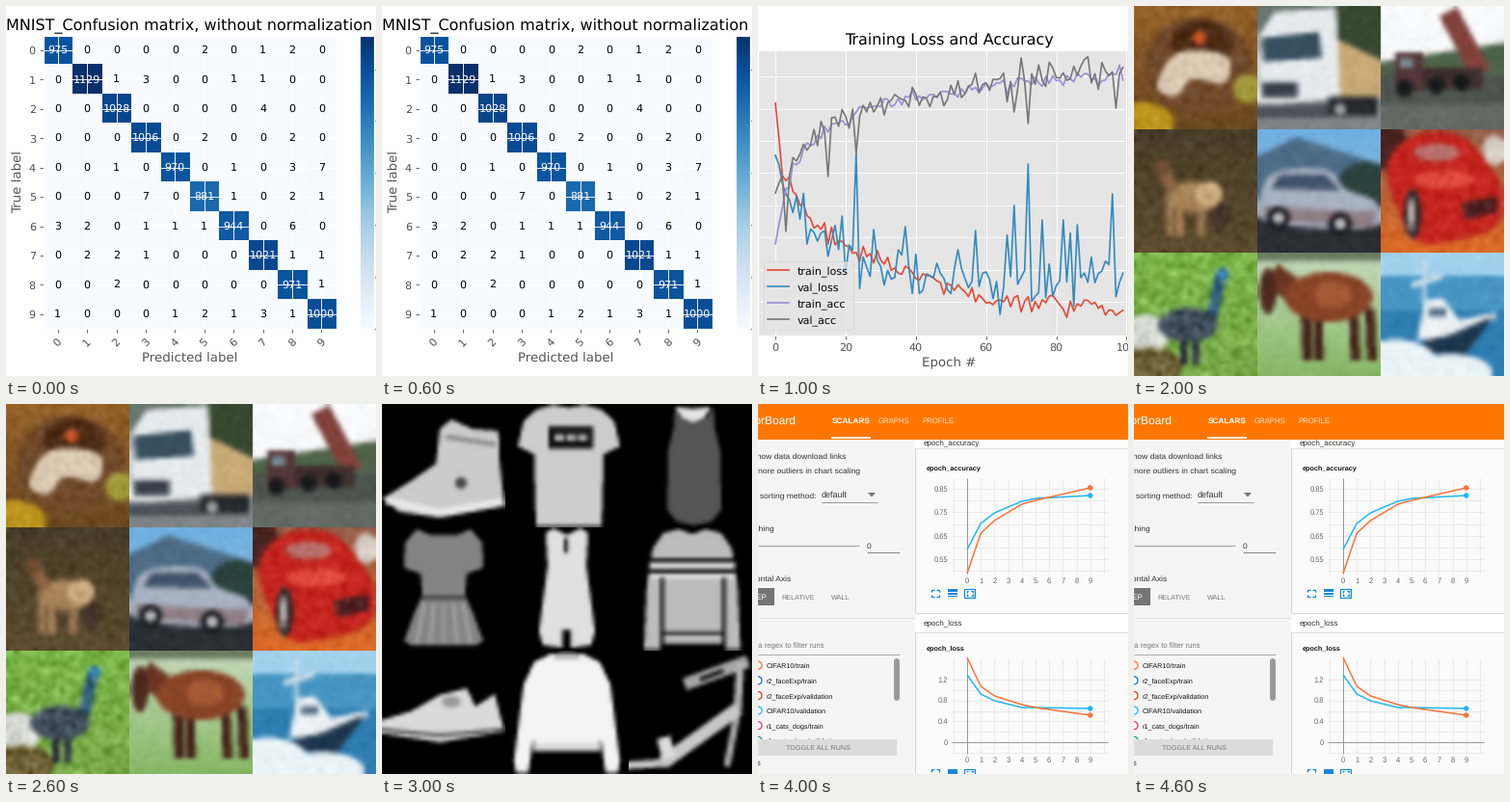
These frames come from a looping animation (384x384 px, 5000 ms). A matplotlib script:

```python
import numpy as np
import matplotlib.pyplot as plt
from matplotlib.animation import FuncAnimation
from matplotlib.colors import to_rgb
from matplotlib.patches import Circle, Rectangle
from matplotlib.path import Path

SIZE, DPI, CELL = 384, 80, 128
PT = 72 / DPI  # points per pixel

plt.style.use("ggplot")
plt.rcParams["text.hinting"] = "none"
fig = plt.figure(figsize=(SIZE / DPI, SIZE / DPI), dpi=DPI, facecolor="white")


def add_axes(x0, y0, x1, y1):
    return fig.add_axes([x0 / SIZE, 1 - y1 / SIZE, (x1 - x0) / SIZE, (y1 - y0) / SIZE])


def canvas():
    ax = add_axes(0, 0, SIZE, SIZE)
    ax.set(xlim=(0, SIZE), ylim=(SIZE, 0))
    ax.axis("off")
    return ax


# ---------- confusion matrix ----------
def confusion_scene():
    cm = np.diag([975, 1129, 1028, 1006, 970, 881, 944, 1021, 971, 1000])
    errors = {
        0: {5: 2, 7: 1, 8: 2}, 1: {2: 1, 3: 3, 6: 1, 7: 1}, 2: {7: 4},
        3: {5: 2, 8: 2}, 4: {2: 1, 6: 1, 8: 3, 9: 7},
        5: {3: 7, 6: 1, 8: 2, 9: 1}, 6: {0: 3, 1: 2, 3: 1, 4: 1, 5: 1, 8: 6},
        7: {1: 2, 2: 2, 3: 1, 8: 1, 9: 1}, 8: {2: 2, 9: 1},
        9: {0: 1, 4: 1, 5: 2, 6: 1, 7: 3, 8: 1},
    }
    for row, cols in errors.items():
        for col, count in cols.items():
            cm[row, col] = count
    ax = add_axes(38.6, 30.8, 342.6, 335)
    im = ax.imshow(cm, cmap="Blues", interpolation="nearest", aspect="auto")
    ax.set_title("MNIST_Confusion matrix, without normalization")
    ax.set(xlabel="Predicted label", ylabel="True label",
           xticks=range(10), yticks=range(10))
    ax.tick_params(axis="x", labelrotation=45)
    for (row, col), count in np.ndenumerate(cm):
        ax.text(col, row, str(count), ha="center", va="center",
                color="white" if count > cm.max() / 2 else "black")
    cax = add_axes(367, 30.8, 382.4, 335)
    cax.grid(False)
    fig.colorbar(im, cax=cax)
    return [ax, cax]


# ---------- training curves, heights in stage pixels ----------
def training_scene():
    rng = np.random.default_rng(4)
    epochs = np.arange(100)

    def curve(trend, noise, spikes=None):
        """Noise around a trend through key points, with single-epoch spikes."""
        y = np.interp(epochs, list(trend), list(trend.values()))
        y += rng.normal(0, 1, 100) * noise * np.minimum(1, epochs / 4)
        for epoch, height in (spikes or {}).items():
            y[epoch] = height
        return y

    acc = {0: 247, 2: 206, 5: 172, 9: 148, 15: 124, 26: 106, 40: 94, 60: 82, 99: 70}
    series = {
        "train_loss": curve({0: 101, 2: 172, 8: 213, 20: 252, 40: 279, 60: 304, 99: 316}, 5),
        "val_loss": curve({0: 155, 4: 195, 10: 230, 30: 268, 50: 285, 75: 290, 99: 278}, 17,
                          {23: 153, 28: 232, 52: 253, 57: 233, 68: 207, 72: 164, 76: 222,
                           82: 222, 86: 227, 96: 195}),
        "train_acc": curve(acc, 4),
        "val_acc": curve({**acc, 0: 194, 2: 178, 5: 160}, 8,
                         {3: 234, 15: 177, 23: 153, 68: 110, 72: 122, 97: 106}),
    }
    ax = add_axes(0, 46.1, 396.8, 341.8)
    for name, y in series.items():
        ax.plot(y, label=name)
    ax.set(xlim=(-4.95, 103.95), ylim=(341.8, 46.1), xlabel="Epoch #",
           xticks=range(0, 101, 20), yticks=73.3 + 33.4 * np.arange(8))
    ax.set_title("Training Loss and Accuracy")
    ax.legend(loc="lower left", labelspacing=0.55)
    return [ax]


# ---------- shapes: a colour and an outline in tile pixels ----------
def poly(color, *xy):
    return color, np.reshape(xy, (-1, 2))


def bar(color, x0, y0, x1, y1):
    return poly(color, x0, y0, x1, y0, x1, y1, x0, y1)


def oval(color, x, y, rx, ry=None):
    a = np.linspace(0, 2 * np.pi, 24)
    return color, np.column_stack([x + rx * np.cos(a), y + (ry or rx) * np.sin(a)])


def limb(color, width, x0, y0, x1, y1):
    a, b = np.array([x0, y0]), np.array([x1, y1])
    side = np.array([y0 - y1, x1 - x0]) * width / 2 / np.hypot(x1 - x0, y1 - y0)
    return color, np.array([a + side, b + side, b - side, a - side])


def blob(color, *xy):
    """Closed Catmull-Rom curve through key points."""
    b = np.reshape(xy, (-1, 1, 2)).astype(float)
    a, c, d = (np.roll(b, k, axis=0) for k in (1, -1, -2))
    t = np.linspace(0, 1, 6, endpoint=False)[:, None]
    curve = b + t / 2 * (c - a + t * (2 * a - 5 * b + 4 * c - d + t * (3 * (b - c) + d - a)))
    return color, curve.reshape(-1, 2)


def mirror(color, center, *half):
    """Symmetric outline; half lists distances from the centre line and heights."""
    right = np.reshape(half, (-1, 2))
    left = right[::-1] * [-1, 1]
    return color, np.vstack([right, left]) + [center, 0]


def tile(ax, index, n, top, bottom, *shapes, grain=0.0):
    """Rasterise shapes on an n x n grid and enlarge it smoothly."""
    c = (np.arange(4 * n) + 0.5) * CELL / (4 * n)
    gx, gy = np.meshgrid(c, c)
    points = np.column_stack([gx.ravel(), gy.ravel()])
    mix = (gy / CELL)[..., None]
    img = np.array(to_rgb(top)) * (1 - mix) + np.array(to_rgb(bottom)) * mix
    for color, outline in shapes:
        img[Path(outline).contains_points(points).reshape(gx.shape)] = to_rgb(color)
    img = img.reshape(n, 4, n, 4, 3).mean(axis=(1, 3))
    img += np.random.default_rng(index).normal(0, grain, (n, n, 1))
    x, y = index % 3 * CELL, index // 3 * CELL
    ax.imshow((img.clip(0, 1) * 255).astype(np.uint8), aspect="auto",
              interpolation="bicubic", extent=(x, x + CELL, y + CELL, y))


def photo_scene():
    ax = canvas()

    def photo(index, top, bottom, *shapes, grain=0.015):
        tile(ax, index, 32, top, bottom, *shapes, grain=grain)

    photo(0, "#96622a", "#6d4a24",
          oval("#70492a", 66, 62, 56, 50), oval("#4d2c16", 70, 40, 32, 26),
          blob("#dccab4", 40, 52, 68, 46, 98, 54, 94, 80, 60, 76, 44, 94, 24, 84),
          oval("#cf5a2c", 68, 33, 7),
          oval("#bd951f", 6, 120, 36, 20), oval("#a29a3a", 118, 86, 15, 15), grain=0.03)
    photo(1, "#66756c", "#80868a",
          bar("#3a4a32", 80, 0, 128, 60),
          poly("#c9ab78", 82, 34, 128, 56, 128, 94, 82, 94),
          poly("#e6ebee", 2, 30, 18, 6, 82, 2, 86, 96, 0, 104),
          poly("#38505f", 5, 33, 64, 27, 67, 54, 6, 58),
          bar("#39424c", 5, 79, 42, 95), bar("#4d545b", 0, 102, 74, 116),
          bar("#25282c", 74, 94, 124, 114), oval("#9a9da0", 86, 107, 6))
    photo(2, "#fbfcfd", "#f2f5f6",
          poly("#50644a", 0, 58, 128, 38, 128, 80, 0, 80),
          bar("#4f5651", 0, 72, 128, 102), bar("#646b66", 0, 102, 128, 128),
          limb("#81423c", 21, 70, 6, 104, 70),
          bar("#40302f", 40, 64, 106, 86), bar("#56383a", 15, 48, 44, 88),
          bar("#7b9195", 20, 54, 34, 64),
          *[oval("#17191b", x, 88 - 0.1 * x, 9) for x in (25, 58, 84)])
    legs = [limb("#a27f58", 9, x, 76, x, 111) for x in (38, 48, 70)]
    photo(3, "#483d29", "#5d4c2e",
          oval("#463528", 88, 90, 11, 17), *legs,
          oval("#a88359", 62, 70, 29, 16), oval("#cbab80", 78, 67, 14, 13),
          limb("#8a6240", 13, 42, 64, 30, 44), oval("#6e4d31", 28, 40, 8, 10), grain=0.03)
    wheels = [oval(color, x, y, r) for x, y in ((22, 92), (86, 98))
              for color, r in (("#17191d", 12), ("#bcbcc0", 6))]
    photo(4, "#6fb0e2", "#8fb4cc",
          poly("#4d6d87", 0, 28, 40, 8, 128, 36, 128, 80, 0, 80),
          oval("#2b423d", 112, 56, 28, 22), bar("#2b3036", 0, 74, 128, 128),
          blob("#a9b2c2", 4, 66, 20, 44, 72, 42, 92, 62, 124, 76, 118, 102, 10, 96),
          poly("#8f7f84", 6, 80, 124, 86, 120, 102, 8, 94),
          poly("#41546a", 14, 62, 24, 47, 70, 47, 86, 63), *wheels)
    photo(5, "#93604c", "#dd6a24",
          oval("#4a2420", 8, 18, 20, 26), oval("#d8cfc6", 118, 22, 12, 16),
          blob("#c4261f", 6, 44, 34, 6, 82, 6, 110, 34, 126, 62, 122, 98, 84, 114, 36, 114),
          oval("#b8706c", 58, 24, 24, 9), oval("#df4a3c", 66, 52, 32, 9),
          poly("#4e2024", 84, 76, 121, 69, 121, 86, 88, 94),
          oval("#2d272b", 33, 88, 9, 26), oval("#b3aaa8", 32, 88, 4, 18), grain=0.03)
    photo(6, "#79b548", "#7aa848",
          oval("#d8dcd4", 12, 84, 26, 20), oval("#6f6238", 16, 118, 34, 20),
          *[limb("#2d3640", 8, x, 84, x, 116) for x in (52, 64)],
          limb("#35607f", 12, 80, 70, 90, 24), oval("#2f78a8", 92, 22, 7, 6),
          oval("#424e5b", 56, 75, 31, 18), grain=0.07)
    front, back = (50, 62), (100, 117)
    photo(7, "#c9dbc0", "#86b763",
          bar("#6e7f61", 0, 0, 128, 9),
          *[limb("#45231a", 10, x, 58, x + 2, 112) for x in front + back],
          limb("#6b3623", 26, 14, 22, 44, 44), oval("#4e2a1e", 11, 40, 9, 24),
          oval("#8a4529", 74, 46, 46, 26), oval("#a55a35", 78, 44, 20, 14))
    photo(8, "#a5d3ee", "#8cc4e4",
          bar("#4796c4", 0, 24, 128, 60), bar("#2f7eb2", 0, 60, 128, 128),
          limb("#c5d9e4", 4, 45, 6, 45, 52), limb("#d4e4ec", 6, 32, 34, 64, 24),
          poly("#edf2f5", 38, 90, 46, 50, 64, 47, 82, 70, 120, 62, 118, 70, 72, 92),
          bar("#46617b", 50, 58, 68, 66),
          poly("#20384f", 42, 92, 70, 86, 117, 66, 88, 106, 50, 104),
          oval("#eaf4f9", 16, 114, 42, 24), oval("#eaf4f9", 72, 124, 44, 19))
    return [ax]


def clothes_scene():
    ax = canvas()

    def item(index, *shapes):
        tile(ax, index, 40, "black", "black", *shapes)

    black, dark = "#000000", "#141414"
    item(0,
         poly("#cbcbcb", 60, 26, 72, 16, 94, 26, 121, 28, 122, 60, 127, 106, 60, 118,
              18, 112, 1, 98, 30, 80, 56, 62),
         limb("#8f8f8f", 5, 66, 34, 118, 42), limb("#e9e9e9", 8, 4, 100, 60, 113),
         limb("#e9e9e9", 8, 60, 113, 126, 101), oval("#4a4a4a", 82, 82, 6))
    item(1,
         mirror("#cdcdcd", 66, 0, 4, 16, 1, 34, 6, 47, 18, 53, 44, 36, 52, 34, 126),
         bar(dark, 45, 23, 91, 46),
         *[bar("#a8a8a8", x, 31, x + 10, 38) for x in (51, 63, 75)])
    item(2,
         mirror("#565656", 68, 0, 18, 14, 14, 20, 2, 21, 24, 27, 48, 28, 110, 18, 122, 0, 126),
         mirror("#e6e6e6", 67, 0, 19, 12, 14, 18, 3, 0, 5))
    item(3,
         mirror("#848484", 64, 0, 8, 14, 8, 28, 2, 40, 16, 41, 42, 24, 48, 22, 70, 30, 88,
                41, 118, 34, 122),
         bar("#4c4c4c", 41, 70, 87, 75),
         *[limb("#a2a2a2", 4, 64 + d, 78, 64 + 1.4 * d, 121) for d in range(-20, 21, 10)])
    item(4,
         mirror("#e0e0e0", 64, 0, 8, 14, 1, 22, 6, 20, 40, 24, 70, 29, 108, 25, 122, 5, 125),
         bar(dark, 61, 11, 65, 26), bar(black, 59, 106, 68, 128))
    item(5,
         mirror("#bcbcbc", 66, 0, 7, 14, 2, 30, 6, 41, 22, 47, 60, 50, 126),
         *[bar(color, 22, y, 110, y + 5)
           for y, color in ((32, dark), (37, "#f0f0f0"), (43, dark), (48, "#e5e5e5"))],
         *[bar(dark, x - 2, 52, x + 2, 128) for x in (35, 99)],
         bar("#333333", 37, 108, 97, 112), bar(black, 34, 121, 100, 128))
    item(6,
         poly("#dadada", 0, 72, 30, 63, 60, 46, 88, 39, 97, 58, 117, 45, 127, 84,
              60, 95, 0, 86),
         limb("#5c5c5c", 4, 0, 82, 60, 88), limb("#5c5c5c", 4, 60, 88, 126, 82),
         oval("#9c9c9c", 72, 53, 10, 6))
    item(7,
         mirror("#f4f4f4", 64, 0, 6, 16, 3, 34, 12, 45, 35, 55, 114, 53, 126, 40, 126,
                35, 90, 34, 104),
         oval("#bdbdbd", 64, 6, 15, 4), bar("#d0d0d0", 31, 97, 97, 101))
    item(8,
         limb("#a5a5a5", 13, 58, 35, 124, 11), limb(black, 4, 74, 30, 98, 21),
         limb("#b5b5b5", 8, 116, 12, 113, 62), limb("#a9a9a9", 7, 114, 58, 102, 120),
         limb("#c8c8c8", 8, 0, 119, 44, 116), limb("#c8c8c8", 14, 36, 116, 114, 60),
         limb("#dcdcdc", 14, 36, 90, 42, 112))
    return [ax]


# ---------- dashboard ----------
def dashboard_scene():
    ax = canvas()
    orange, cyan, icon = "#ff7034", "#1fb6f2", "#1687d9"

    def rect(x0, y0, x1, y1, color):
        ax.add_patch(Rectangle((x0, y0), x1 - x0, y1 - y0, color=color, lw=0, zorder=3))

    def line(x, y, color, px=1.0):
        ax.plot(x, y, color=color, lw=px * PT, zorder=3, solid_capstyle="butt")

    def dot(x, y, r, **style):
        ax.add_patch(Circle((x, y), r, zorder=3, **style))

    def text(x, y, s, px=8.5, color="#333333", ha="left", weight="normal"):
        ax.text(x, y + 0.35 * px, s, fontsize=px * PT, color=color, ha=ha,
                va="baseline", weight=weight, family="Liberation Sans")

    def corners(x, y, w, h, arm):
        for sx in (-1, 1):
            for sy in (-1, 1):
                cx, cy = x + sx * w, y + sy * h
                line([cx - sx * arm, cx, cx], [cy, cy, cy - sy * arm], icon, 1.3)

    def chart(title, top, labels, step, first, axis_y, curves):
        bottom = top + 99
        text(175, top - 11, title, 7.3, "#111111", weight="bold")
        for x in 217 + 14.2 * np.arange(-1, 11):
            line([x, x], [top, bottom], "#e6e6e6", 0.8)
        for y in first + step / 2 * np.arange(8):
            line([201, 363], [y, y], "#e6e6e6", 0.8)
        line([217, 217], [top, bottom], "#9a9a9a")
        if axis_y:
            line([201, 363], [axis_y, axis_y], "#9a9a9a")
        for k, label in enumerate(labels):
            text(197, first + k * step, label, 7.5, "#666666", "right")
        epochs = np.arange(10)
        xs = 217 + 14.2 * epochs
        for k, x in enumerate(xs):
            text(x, bottom + 7, str(k), 7.5, "#666666", "center")
        for color, keys in curves:
            ys = np.interp(epochs, [0, 1, 2, 4, 5, 9], keys)
            line(xs, ys, color, 1.5)
            dot(xs[-1], ys[-1], 2.7, color=color, lw=0)
        y = bottom + 20.5
        corners(184, y, 3.6, 3.6, 2.4)
        for dy, h in ((-4.5, 3.2), (-0.6, 2.2), (2.4, 1.3)):
            rect(197, y + dy, 207, y + dy + h, icon)
        line([214, 225, 225, 214, 214], y + np.array([-4.5, -4.5, 4.5, 4.5, -4.5]), icon, 1.2)
        corners(219.5, y, 3, 2.3, 1.5)

    # side panel
    rect(0, 0, 163, SIZE, "#f5f5f5")
    rect(163, 0, SIZE, SIZE, "#fbfbfb")
    line([162.5, 162.5], [37, SIZE], "#d5d5d5")
    text(91, 54, "Show data download links", ha="right")
    text(106, 69, "Ignore outliers in chart scaling", ha="right")
    text(61, 95, "Tooltip sorting method:", ha="right")
    text(66, 94, "default", 9)
    ax.fill([114, 122, 118], [92, 92, 96.5], color="#777777", lw=0, zorder=3)
    line([66, 124], [102, 102], "#999999")
    text(17, 129, "Smoothing", ha="right")
    line([0, 105], [147, 147], "#aaaaaa", 1.3)
    text(113, 147, "0")
    line([113, 147], [153.5, 153.5], "#888888")
    text(34, 181, "Horizontal Axis", ha="right")
    rect(0, 191, 17, 209, "#757575")
    text(9, 200, "STEP", 7.5, "white", "right")
    text(42, 200, "RELATIVE", 7.2, "#777777", "center")
    text(86, 200, "WALL", 7.2, "#777777", "center")
    line([0, 162], [221.5, 221.5], "#e0e0e0")
    text(69, 251, "Write a regex to filter runs", 7.8, "#777777", "right")
    line([0, 147], [259.5, 259.5], "#aaaaaa")
    runs = [("CIFAR10/train", orange), ("r2_faceExp/train", "#1477bb"),
            ("r2_faceExp/validation", "#d23b22"), ("CIFAR10/validation", cyan),
            ("r1_cats_dogs/train", "#ee3377"), ("r1_cats_dogs/validation", "#119988")]
    for k, (name, color) in enumerate(runs):
        y = 271.3 + 15.6 * k
        dot(0, y, 4, fc="white", ec=color, lw=1.3 * PT)
        text(9, y, name, 7.3, "#111111")
    ax.plot([144, 144], [267, 305], color="#9a9a9a", lw=6 * PT,
            solid_capstyle="round", zorder=3)
    rect(0, 348, 144, 365, "#dcdcdc")
    text(62, 356.5, "TOGGLE ALL RUNS", 7.3, "#777777", "center")
    text(3, 373, "logs", 7.5, ha="right")

    # charts
    for y0, y1, name, y in ((37, 46, "epoch_accuracy", 41), (217, 237, "epoch_loss", 228)):
        rect(163, y0, SIZE, y1, "#ffffff")
        line([163, SIZE], [y1, y1], "#dddddd")
        text(172, y, name, 8)
    line([163, SIZE], [216.5, 216.5], "#dddddd")
    chart("epoch_accuracy", 77, ["0.85", "0.75", "0.65", "0.55"], 24.4, 88, None,
          [(cyan, [151, 124, 113, 101, 98, 95]), (orange, [176, 134, 121, 104, 100, 87])])
    chart("epoch_loss", 263.5, ["1.2", "0.8", "0.4", "0"], 21.7, 286, 351,
          [(cyan, [281, 301, 308, 315, 315, 316]), (orange, [263, 293, 303, 312, 315, 323])])

    # header
    rect(0, 0, SIZE, 37, "#ff7700")
    text(40, 17, "TensorBoard", 12, "white", "right")
    text(96.5, 17, "SCALARS", 8.3, "white", "center", "bold")
    text(140.5, 17, "GRAPHS", 7.8, "#ffe3c8", "center")
    text(186.5, 17, "PROFILE", 7.8, "#ffe3c8", "center")
    rect(76, 34, 117, 36, "white")
    return [ax]


scenes = [confusion_scene(), training_scene(), photo_scene(),
          clothes_scene(), dashboard_scene()]


def show(i):
    for k, group in enumerate(scenes):
        for ax in group:
            ax.set_visible(k == i)
    return []


anim = FuncAnimation(fig, show, frames=len(scenes), interval=1000, repeat=True)
plt.show()
```
